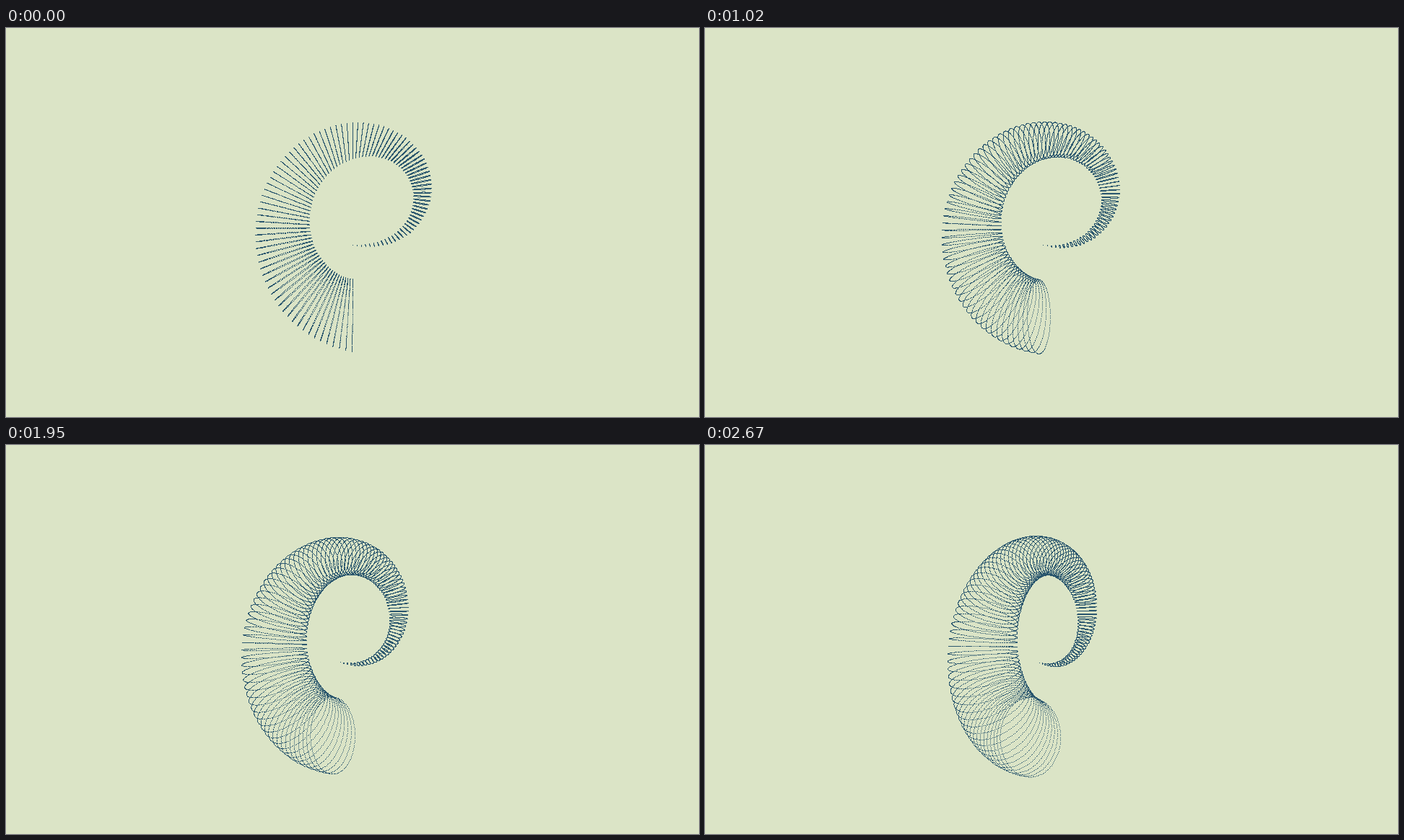
An HTML page with a canvas for the animation above (2700 ms loop, 960 by 540 pixels).

```html
<!DOCTYPE html>
<html lang="en">
<head>
<meta charset="utf-8">
<title>Turning coil</title>
<style>
  html, body { margin: 0; width: 100%; height: 100%; overflow: hidden; background: #dbe4c6; }
  canvas { display: block; }
</style>
</head>
<body>
<canvas id="stage" width="960" height="540"></canvas>
<script>
const ctx = document.getElementById('stage').getContext('2d');
const STEP = 30, STEPS = 90;
const RINGS = 100, DOTS = 150;
const CX = 480, CY = 270;
const COIL_RADIUS = 97, DROP = 98.5, TUBE = 49.6;
const DEPTH = 720;
const PIVOT = { x: 44, z: 37 };

function makeCamera(k) {
  const yaw = 0.88 * k, roll = 0.14 * k;
  const cy = Math.cos(yaw), sy = Math.sin(yaw);
  const cr = Math.cos(roll), sr = Math.sin(roll);
  const squash = 1 - 0.03 * k;
  return (x, y, z) => {
    const rx = x * cr - y * sr - PIVOT.x;
    const ry = (x * sr + y * cr) * squash;
    const rz = z - PIVOT.z;
    const near = rz * cy - rx * sy + PIVOT.z;
    const scale = DEPTH / (DEPTH - near);
    return [CX + (rx * cy + rz * sy + PIVOT.x) * scale, CY + ry * scale];
  };
}

function draw(step) {
  const k = step / (STEPS - 1);
  const project = makeCamera(k);
  const tube = TUBE * (1 + 0.035 * k);
  ctx.fillStyle = '#dbe4c6';
  ctx.fillRect(0, 0, 960, 540);
  ctx.fillStyle = '#2b576e';
  for (let i = 0; i <= RINGS; i++) {
    const u = i / RINGS;
    const angle = u * 2 * Math.PI;
    const r = tube * u;
    for (let j = 0; j < DOTS; j++) {
      const v = j / DOTS * 2 * Math.PI;
      const reach = COIL_RADIUS + r * Math.cos(v);
      const [px, py] = project(
        reach * Math.sin(angle),
        reach * Math.cos(angle) - 66 + DROP * u,
        r * Math.sin(v) - 6 * u
      );
      ctx.fillRect(Math.floor(px), Math.floor(py), 1, 1);
    }
  }
}

let shown = -1;
function tick(now) {
  const step = Math.floor(now / STEP) % STEPS;
  if (step !== shown) draw(shown = step);
  requestAnimationFrame(tick);
}
draw(0);
requestAnimationFrame(tick);
</script>
</body>
</html>
```
